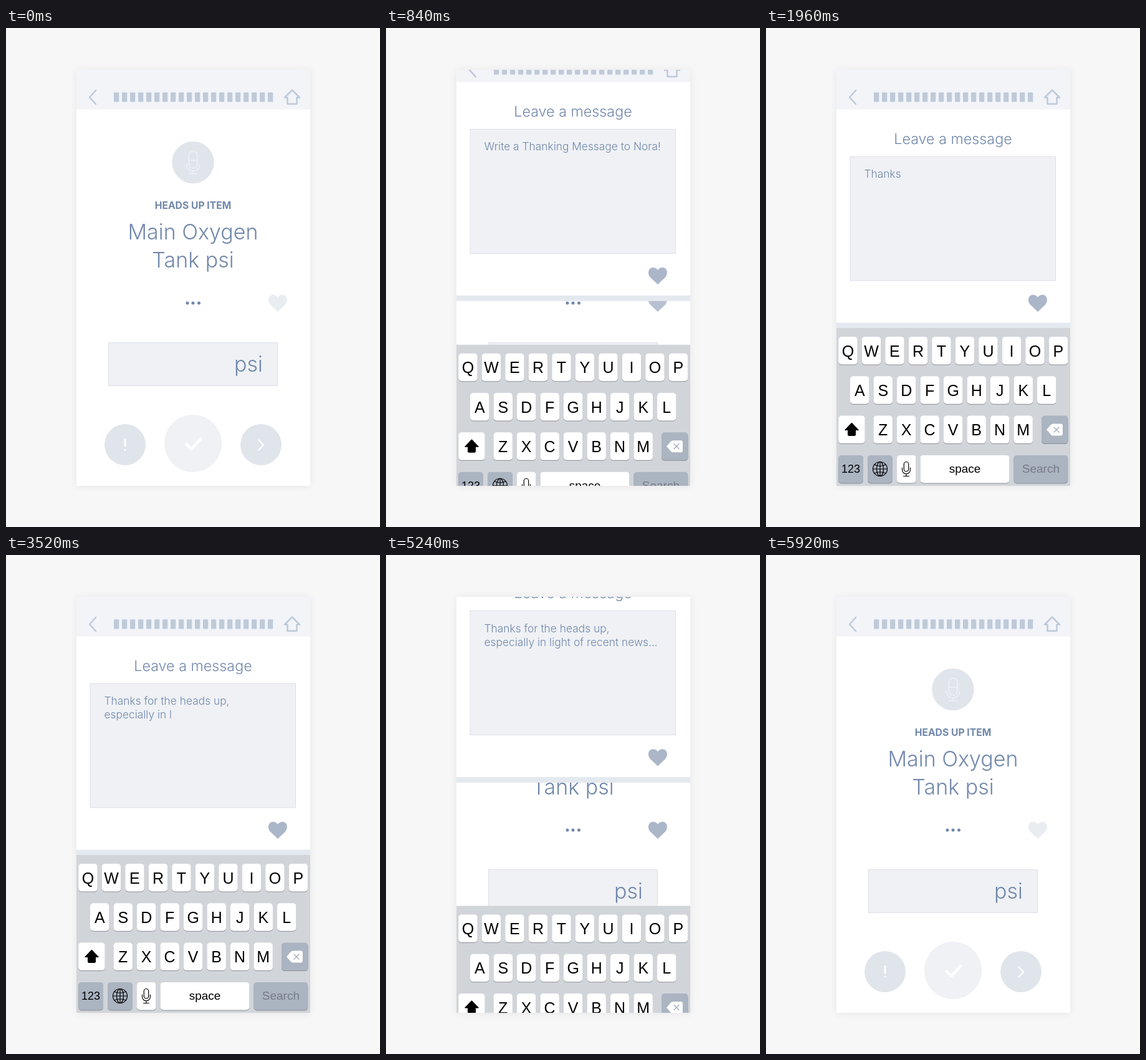
Write an HTML page that moves like this. It is 600x800 px and loops after 6.08 s.

```html
<!DOCTYPE html>
<html lang="en">
<head>
<meta charset="utf-8">
<title>Leave a message</title>
<style>
  html, body { margin: 0; width: 100%; height: 100%; overflow: hidden; background: #f7f7f7; }
  svg { display: block; width: 100vw; height: 100vh; }
  text { font-family: Inter, "Open Sans", sans-serif; font-weight: 300; fill: #7188ab; }
  .mid { text-anchor: middle; }
  .big { font-size: 34px; }
  .title { font-size: 23.3px; }
  .note { font-size: 17.35px; }
  .label { font-size: 15.7px; font-weight: 700; }
  .field { fill: #eff1f5; stroke: #dbe0e8; }
  .line { fill: none; stroke-linecap: round; stroke-linejoin: round; }
  #keys text { font: 25px "Liberation Sans", Arial, sans-serif; fill: #000; text-anchor: middle; }
  #keys .word { font-size: 19px; }
</style>
</head>
<body>
<svg viewBox="0 0 600 800">
  <defs>
    <clipPath id="screen"><path d="M113 67H488V734H113Z"/></clipPath>
    <filter id="soft" x="-10%" y="-10%" width="120%" height="120%"><feGaussianBlur stdDeviation="7"/></filter>
    <path id="heart" d="M436 455L424.500 444C418.500 438 420.500 427.700 428.500 427.700C432 427.700 434.700 429.500 436 432C437.300 429.500 440 427.700 443.500 427.700C451.500 427.700 453.500 438 447.500 444Z"/>
    <g id="header">
      <path fill="#f2f4f8" d="M113 67H488V130.500H113Z"/>
      <g id="bars" fill="#bfcad9"></g>
      <g class="line" stroke="#bfcad9" stroke-width="2.500">
        <path d="M144 100L134 111L144 122"/>
        <path d="M459 99.500L471 111.500H466.500V121.700H451.500V111.500H447Z"/>
      </g>
    </g>
  </defs>

  <rect x="113" y="68" width="375" height="667" opacity=".07" filter="url(#soft)"/>
  <g clip-path="url(#screen)">
    <path fill="#fff" d="M113 67H488V734H113Z"/>
    <use href="#header"/>
    <circle cx="300" cy="215.500" r="33.700" fill="#e0e5eb"/>
    <g class="line" stroke="#f0f2f5" stroke-width="1.300">
      <rect x="293.300" y="197.500" width="13.600" height="27" rx="6.500"/>
      <path d="M293.300 212H307M289.500 218C290 233 310.500 233 311 218M300 229.500V233.500M293.500 233.500H306.500"/>
    </g>
    <text class="mid label" x="300" y="290">HEADS UP ITEM</text>
    <text class="mid big" x="300" y="339">Main Oxygen</text>
    <text class="mid big" x="300" y="384">Tank psi</text>
    <path class="line" stroke="#7188ab" stroke-width="5" d="M291 441h0M300 441h0M309.500 441h0"/>
    <use href="#heart" id="like"/>
    <rect class="field" x="164.500" y="504.500" width="271" height="69"/>
    <text class="big" x="412" y="551" text-anchor="end">psi</text>
    <g fill="#e0e5eb">
      <circle cx="191" cy="668" r="33"/>
      <circle cx="300" cy="666" r="46" fill="#eff1f5"/>
      <circle cx="409" cy="668" r="33"/>
    </g>
    <g class="line" stroke="#fff">
      <path stroke-width="3" d="M191 659.500V670M191 676h0"/>
      <path stroke-width="4.500" d="M289.500 667.500L297.500 675L312 659"/>
      <path stroke-width="2.200" d="M405.500 660.500L413 668.500L405.500 676.500"/>
    </g>

    <g id="panel">
      <path fill="#fff" d="M113 67H488V473H113Z"/>
      <path fill="#e4e9f0" d="M113 472.500H488V481.500H113Z"/>
      <use href="#header"/>
      <text class="mid title" x="300" y="185.500">Leave a message</text>
      <rect class="field" x="135" y="206" width="329.500" height="199"/>
      <text class="note" id="hint" x="157.500" y="240">Write a Thanking Message to Nora!</text>
      <text class="note" id="row1" x="157.500" y="240"></text>
      <text class="note" id="row2" x="157.500" y="262"></text>
      <use href="#heart" fill="#abb6c9"/>
    </g>

    <g id="keys">
      <path fill="#d1d5da" d="M113 481H488V736H113Z"/>
      <g id="caps"></g>
      <path d="M137.500 633L148.500 644.500H143.500V652Q143.500 653.500 142 653.500H133Q131.500 653.500 131.500 652V644.500H126.500Z" stroke="#000" stroke-linejoin="round"/>
      <path fill="#fff" d="M450 644L457 636Q458.500 634.500 460.500 634.500H473Q476 634.500 476 637.500V650.500Q476 653.500 473 653.500H460.500Q458.500 653.500 457 652Z"/>
      <path class="line" stroke="#abb4c1" stroke-width="1.600" d="M462 640L470 648M470 640L462 648"/>
      <g class="line" stroke="#000" stroke-width="1.200">
        <circle cx="183" cy="707" r="11.500"/>
        <ellipse cx="183" cy="707" rx="5.500" ry="11.500"/>
        <path d="M183 695.500V718.500M171.500 707H194.500M174 700Q183 704.500 192 700M174 714Q183 709.500 192 714"/>
        <rect x="221.300" y="695.500" width="7.400" height="15.500" rx="3.700"/>
        <path d="M218.500 705V708C218.500 717 231.500 717 231.500 708V705M225 715V718.500M220.500 718.500H229.500"/>
      </g>
    </g>
  </g>
</svg>
<script>
const $ = id => document.getElementById(id);
const LOOP = 6080, STEP = 40, CHAR_MS = 45.6;
const MESSAGE = "Thanks for the heads up,\nespecially in light of recent news...";

for (let i = 0; i < 20; i++)
  $("bars").innerHTML += `<rect x="${173 + i * 13}" y="103.300" width="8.300" height="15.200" rx="1"/>`;

function key(x, row, w, label = "", fill = "#fff", style = "") {
  const y = 495 + row * 63.3;
  $("caps").innerHTML +=
    `<rect x="${x}" y="${y + 1}" width="${w}" height="44.500" rx="5" fill="#8b8f95"/>` +
    `<rect x="${x}" y="${y}" width="${w}" height="44.500" rx="5" fill="${fill}"/>` +
    `<text x="${x + w / 2}" y="${y + (style ? 28 : 31.5)}" ${style}>${label}</text>`;
}
[["QWERTYUIOP", 116.2], ["ASDFGHJKL", 135], ["ZXCVBNM", 172.4]].forEach(([letters, x], row) =>
  [...letters].forEach((c, i) => key(x + i * 37.5, row, 30.5, c)));
const GREY = "#abb4c1";
key(116.2, 2, 42.5);
key(442, 2, 42.5, "", GREY);
key(116.2, 3, 39.8, "123", GREY, 'class="word" style="font-size:18px"');
key(163, 3, 39.8, "", GREY);
key(210, 3, 30.5);
key(247.5, 3, 143, "space", "#fff", 'class="word"');
key(397.5, 3, 86.800, "Search", GREY, 'class="word" style="fill:#757c86"');

const span = (t, a, b) => Math.min(1, Math.max(0, (t - a) / (b - a)));
const shift = (id, y) => $(id).setAttribute("transform", `translate(0 ${y})`);
const mix = (a, b, k) => Math.round(a + (b - a) * k);

function draw(t) {
  // Slide in with a sine ease, leave while speeding up.
  const away = (1 + Math.cos(Math.PI * span(t, 524, 924))) / 2;
  const exit = span(t, 4860, 5480);
  shift("panel", -416 * (away + exit ** 2.6));
  shift("keys", 255 * (away + exit ** 2.33));

  const liked = span(t, 480, 880) ** 2 - span(t, 5800, 5920);
  $("like").setAttribute("fill", `rgb(${mix(233, 171, liked)},${mix(237, 182, liked)},${mix(242, 201, liked)})`);

  $("hint").setAttribute("opacity", 1 - span(t, 1480, 1560));
  const count = t < 1710 ? 0 : Math.floor((t - 1710) / CHAR_MS) + 1;
  const [first, second = ""] = MESSAGE.slice(0, count).split("\n");
  $("row1").textContent = first;
  $("row2").textContent = second;
}

const start = performance.now();
function tick() {
  const t = (performance.now() - start) % LOOP;
  draw(t - t % STEP);
  requestAnimationFrame(tick);
}
tick();
</script>
</body>
</html>
```
